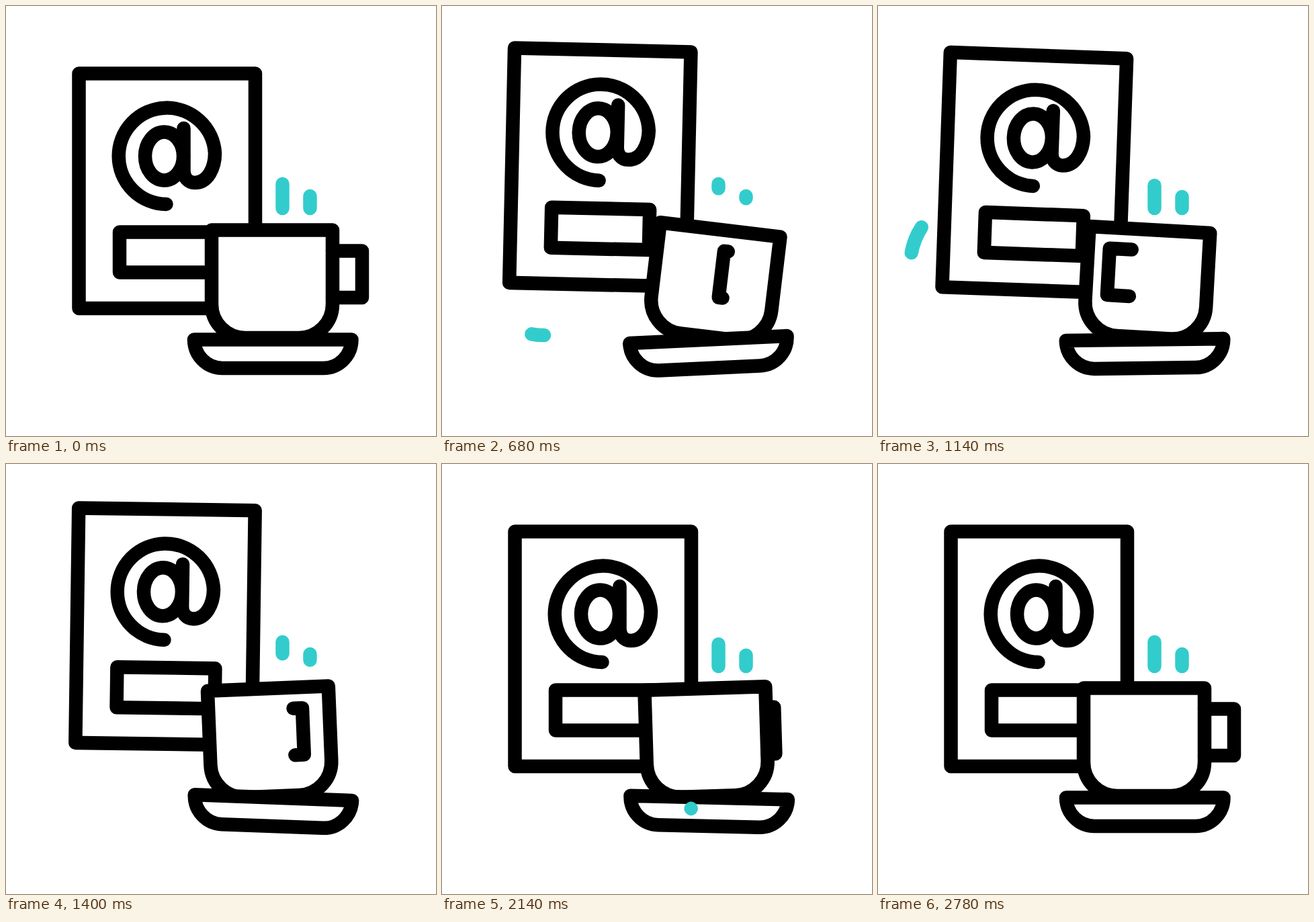
Write an HTML page that moves like this. It is 640x640 px and loops after 3340 ms.

```html
<!DOCTYPE html>
<html lang="en">
<head>
<meta charset="utf-8">
<title>Cup and card</title>
<style>
  html, body { margin: 0; width: 100%; height: 100%; overflow: hidden; background: #fff; }
  svg { display: block; width: 100%; height: 100%; }
  path, rect, ellipse { stroke: #000; stroke-width: 20.5; stroke-linecap: round; stroke-linejoin: round; fill: #fff; }
  .line { fill: none; }
  .teal { fill: none; stroke: #3cc; }
</style>
</head>
<body>
<svg viewBox="0 0 640 640">
  <g id="card">
    <rect x="108.5" y="100.5" width="262.5" height="349.5"/>
    <path class="line" d="M238.5 295A71.7 71.7 0 1 1 311 219C311 240 301 263 281 263C271 263 264.5 255 264.5 245V182"/>
    <ellipse class="line" cx="235.5" cy="223.5" rx="28.5" ry="36"/>
    <rect x="169" y="336.5" width="146" height="60"/>
  </g>
  <path id="steamL" class="teal"/>
  <path id="steamR" class="teal"/>
  <g id="cup">
    <path d="M306 333.5H486V444A50 50 0 0 1 436 494H356A50 50 0 0 1 306 444Z"/>
    <path id="handle" class="line"/>
  </g>
  <path id="saucer" d="M280 496.5H514.5A42 42.5 0 0 1 472 539H322A42 42.5 0 0 1 280 496.5Z"/>
  <path id="arcL" class="teal"/>
  <path id="arcR" class="teal"/>
</svg>
<script>
const LOOP = 3340;
const el = id => document.getElementById(id);
const move = (id, value) => el(id).setAttribute('transform', value);
const trace = (id, d) => el(id).setAttribute('d', d);

const part = (t, a, b) => Math.min(1, Math.max(0, (t - a) / (b - a)));
const smooth = (t, a, b) => {
  const u = part(t, a, b);
  return u * u * (3 - 2 * u);
};
const slowing = (t, a, b) => Math.sin(part(t, a, b) * Math.PI / 2);

// The card hops twice, tilting on the first hop and straightening on the second.
function drawCard(t) {
  const dip = smooth(t, 730, 980) - smooth(t, 1000, 1265);
  const lift = 37 * (smooth(t, 370, 730) - .6 * dip - smooth(t, 1320, 1720));
  const tilt = 3.1 * smooth(t, 520, 880) - 2.3 * smooth(t, 900, 1400) - .8 * smooth(t, 1680, 1880);
  move('card', `translate(0 ${-lift}) rotate(${tilt} 240 78)`);
}

// Cup and saucer share one swing in opposite directions.
function drawCup(t) {
  const swing = smooth(t, 800, 1570);
  const first = smooth(t, 320, 800) - swing;
  const second = swing - slowing(t, 1780, 2780);
  move('cup', `rotate(${8.1 * first - 3.8 * second} 410 485)`);
  move('saucer', `rotate(${2.9 * second - 3.2 * first} 397 515)`);
}

// The handle turns across the front and back, overshoots and settles.
function drawHandle(t) {
  const back = smooth(t, 1170, 1610);
  const turn = smooth(t, 200, 1000) - back;
  const settle = 10 * back - 42 * smooth(t, 1620, 1900) + 32 * smooth(t, 2140, 2780);
  const inner = 486 - 115 * turn;
  const outer = 530 - 192 * turn + settle;
  trace('handle', `M${inner} 364.5H${outer}V434H${inner}`);
}

// Steam wipes upwards, then grows back from below.
function drawSteam(id, t, x, top, bottom) {
  const [wipe, gone, grow, full] = t < 1190 ? [200, 860, 860, 1190] : [1190, 1600, 1750, 2230];
  const height = bottom - top;
  const y1 = t < grow ? top : bottom - height * smooth(t, grow, full);
  const y2 = t < grow ? bottom - height * smooth(t, wipe, gone) : bottom;
  trace(id, t < gone || t > grow ? `M${x} ${y1}V${y2 + .01}` : '');
}

// A clockwise stroke whose tail chases its head.
function drawArc(id, t, start, cx, cy, r, from) {
  const span = 123;
  const point = deg => {
    const a = deg * Math.PI / 180;
    return `${cx + r * Math.cos(a)} ${cy + r * Math.sin(a)}`;
  };
  const head = from + span * smooth(t, start, start + 365);
  const tail = from + span * smooth(t, start + 220, start + 640);
  const shown = t > start && t < start + 660;
  trace(id, shown ? `M${point(tail)}A${r} ${r} 0 0 1 ${point(head + .01)}` : '');
}

function draw(now) {
  const t = now % LOOP;
  drawCard(t);
  drawCup(t);
  drawHandle(t);
  drawSteam('steamL', t, 411.5, 265, 301);
  drawSteam('steamR', t, 452.5, 283, 301);
  drawArc('arcL', t, 615, 152, 386, 104, 90);
  drawArc('arcR', t, 1495, 409, 413, 107, -12);
}

let begin;
function tick(now) {
  begin ??= now;
  draw(now - begin);
  requestAnimationFrame(tick);
}
draw(0);
requestAnimationFrame(tick);
</script>
</body>
</html>
```
